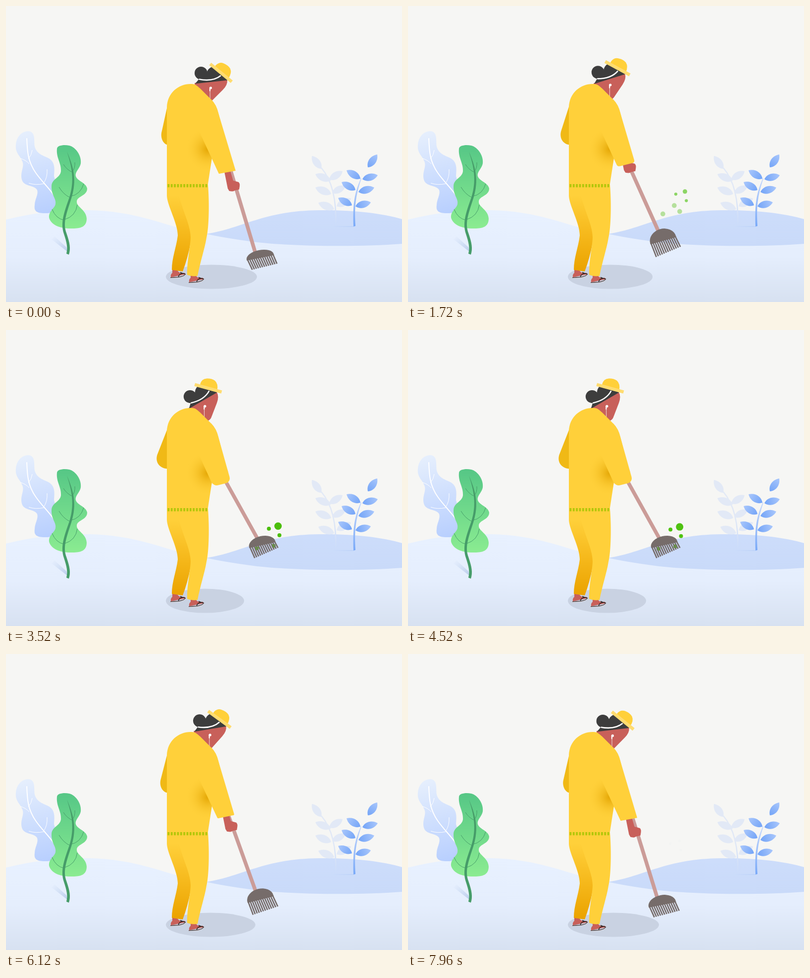
Animation of 800x600 px, one loop 8 s. Source, as an HTML page with a canvas:

```html
<!DOCTYPE html>
<html lang="en">
<head>
<meta charset="utf-8">
<title>Sweeping</title>
<style>
html, body { margin: 0; width: 100%; height: 100%; overflow: hidden; background: #f6f6f4; }
canvas { display: block; width: 800px; height: 600px; }
</style>
</head>
<body>
<canvas id="stage" width="800" height="600"></canvas>
<script>
const ctx = document.getElementById('stage').getContext('2d');
const LOOP = 8000, SWEEP = 1002;
const YELLOW = '#ffd03a', SKIN = '#c8605a', HAIR = '#3d3d3d', BROOM = '#766c6a';

function fill(shape, color) {
  ctx.fillStyle = color;
  ctx.fill(typeof shape === 'string' ? new Path2D(shape) : shape);
}
function stroke(shape, color, width, cap = 'butt') {
  ctx.strokeStyle = color;
  ctx.lineWidth = width;
  ctx.lineCap = cap;
  ctx.stroke(new Path2D(shape));
}
function circle(x, y, r, color) {
  const p = new Path2D();
  p.arc(x, y, r, 0, Math.PI * 2);
  fill(p, color);
}
function gradient(x0, y0, x1, y1, ...colors) {
  const g = ctx.createLinearGradient(x0, y0, x1, y1);
  colors.forEach((c, i) => g.addColorStop(i / (colors.length - 1), c));
  return g;
}
function interpolate(times, values, t) {
  if (t <= times[0]) return values[0];
  for (let i = 1; i < times.length; i++) {
    if (t <= times[i]) {
      const k = (t - times[i - 1]) / (times[i] - times[i - 1]);
      return values[i - 1] + (values[i] - values[i - 1]) * k;
    }
  }
  return values[values.length - 1];
}
function sample(times, tracks, t) {
  const out = {};
  for (const name in tracks) out[name] = interpolate(times, tracks[name], t);
  return out;
}

// Pose values by distance in the cycle from the lowest broom position.
const POSE_TIMES = [0, .056, .122, .2535, .485];
const POSE = {
  shadow: [507, 507, 503, 496, 481],
  head: [0, .5, 4, 9.3, 24],
  elbow: [315, 314.5, 312.5, 310, 305.5],
  outX: [464, 463, 461, 459, 454.5], outY: [334, 332, 325, 318.5, 308],
  inX: [430, 429.5, 427, 424, 419], inY: [340, 338, 332, 327, 317],
  cuff: [.5, .7, 2, 4, 10],
  handX: [0, -1.5, -5.5, -10, -24], handY: [0, -4, -18, -32, -75],
  gripX: [454, 453, 449, 445, 441], gripY: [334, 330, 328, 322, 302],
  baseX: [503, 503, 504, 505, 507], topY: [494, 488, 472, 456, 417],
  leftX: [486, 486, 488, 489, 491], leftY: [514, 512, 500, 487, 440],
  rightX: [541, 541, 540, 541, 544], rightY: [503, 501, 486, 472, 428],
  tipLX: [496, 496, 498, 500, 501], tipLY: [535, 534, 528, 516, 463],
  tipRX: [549, 549.5, 551, 552, 551], tipRY: [522, 520, 509, 494, 441]
};

const DUST_TIMES = [.47, .509, .515, .57, .7465, .878, .944, 1];
const DUST = {
  x: [522, 529, 531.5, 541, 541, 529, 530, 530],
  y: [428, 406.8, 402, 388, 380, 382, 384.5, 386],
  small: [3, 4, 4, 4, 3, 3, 2.5, 2],
  big: [6, 7.5, 7.5, 7, 4, 3, 2.5, 2],
  sat: [90, 84, 90, 85, 52, 4, 4, 4],
  light: [39, 42, 39, 43, 65, 93, 95, 96],
  alpha: [0, .97, 1, 1, 1, 1, .7, 0]
};
const PUFF_TIMES = [.47, .509, .515, .7465, .84];
const PUFF = {
  x: [500, 505, 507, 516, 519],
  y: [454, 445, 442, 418.5, 410],
  r: [3, 4, 4, 5, 5],
  alpha: [0, .9, .9, .3, 0]
};

function leaf(x0, y0, x1, y1, color) {
  const dx = x1 - x0, dy = y1 - y0, w = .3;
  const near = [x0 + dx * .25, y0 + dy * .25], far = [x0 + dx * .7, y0 + dy * .7];
  const p = new Path2D();
  p.moveTo(x0, y0);
  p.bezierCurveTo(near[0] - dy * w, near[1] + dx * w, far[0] - dy * w, far[1] + dx * w, x1, y1);
  p.bezierCurveTo(far[0] + dy * w, far[1] - dx * w, near[0] + dy * w, near[1] - dx * w, x0, y0);
  fill(p, color);
}

function drawLandscape() {
  fill('M0 0H800V600H0Z', '#f6f6f4');
  fill('M0 433C60 418 110 413 170 414C250 416 300 436 350 450Q380 459 405 462H800V600H0Z',
    gradient(0, 414, 0, 600, '#e8f1ff', '#e5eefd', '#d7e1f1'));
  fill('M405 462C480 450 520 415 632 414C700 413 760 420 800 432V482C700 490 560 486 500 478Q440 470 405 462Z',
    gradient(0, 414, 0, 487, '#cdddfb', '#c9daf9'));
}

function drawLeftPlants() {
  fill('M20 280C22 262 35 252 48 254C60 258 56 272 58 285C62 300 75 303 85 308C100 316 98 330 97 345L110 390L100 414C92 420 85 420 78 420C62 420 56 416 58 403C58 392 66 382 63 373C57 362 36 367 32 352C28 336 38 326 33 315C28 302 18 298 20 280Z',
    gradient(40, 254, 80, 420, '#e6effd', '#b8cffe'));
  stroke('M42 268C43 295 44 315 60 338C75 360 95 375 104 398', '#fff', 2);
  stroke('M29 309Q40 312 47 320M45 310Q52 302 53 292M46 359Q60 364 77 360M76 359Q84 348 83 331', '#fff', 1);

  fill('M92 473L98 467L122 489L124 498Z', gradient(93, 468, 122, 496, '#c5d5f000', '#bfd0ee'));
  fill('M103 289C104 282 118 281 128 283C141 286 153 304 151 319C149 330 139 336 141 345C144 355 162 358 164 370C164 385 144 385 143 396C142 408 162 412 163 431C163 448 150 451 135 451C112 452 91 445 87 429C86 415 99 410 100 401C102 390 91 384 92 364C94 349 109 349 111 335C112 318 101 308 103 289Z',
    gradient(0, 283, 0, 451, '#56c786', '#8bec91'));
  fill('M123 295C136 325 144 352 132 390C121 424 115 440 122 460C129 480 131 492 127 504L122 502C125 490 123 480 117 462C110 440 116 422 128 388C139 354 133 325 123 295Z', '#469c69');
  stroke('M116 321Q123 332 134 337M134 336Q140 328 139 317M107 367Q116 382 129 388M130 386Q151 382 157 360M93 412Q101 431 117 434M118 433Q141 426 144 403', '#469c69', 1);
}

function drawRightPlants() {
  const pale = '#e2e9f6';
  stroke('M666 445C668 395 660 355 637 328', gradient(0, 330, 0, 445, pale, '#dfe7f6', '#cbdcfa'), 2.5);
  [[637, 330, 618, 304], [653, 352, 680, 335], [656, 354, 625, 341], [657, 381, 625, 368],
   [659, 379, 686, 365], [663, 412, 631, 399], [668, 406, 697, 390]]
    .forEach(l => leaf(...l, pale));
  stroke('M660 447H703', gradient(660, 0, 703, 0, '#b9d0f800', '#b9d0f8'), 1.5);
  fill('M702 447C701 410 701 385 717 349L718 350C705 388 704 410 706 446Z',
    gradient(0, 350, 0, 447, '#c4d8fc', '#78a8f8'));
  [[731, 327, 750, 301], [716, 350, 688, 333], [720, 351, 751, 343], [706, 373, 678, 357],
   [712, 377, 744, 368], [699, 404, 671, 389], [706, 406, 737, 398]]
    .forEach(l => leaf(...l, gradient(...l, '#73a4f7', '#a9c7fc')));
}

function drawFoot(x, y) {
  ctx.save();
  ctx.translate(x, y);
  fill('M2 -3L11 -2Q13 4 18 6L27 6L28 9L-1 15Q-2 9 2 6Z', SKIN);
  stroke('M-2 15.7L14 14.7Q26 13 29 8', '#4a3a3a', 1.4);
  stroke('M-2 16.8L15 16Q27 14 29.5 9', '#d9d9dc', .8);
  stroke('M14 14Q16 8 23 7L28 8M23 7L18 5', '#262626', 1.4);
  ctx.restore();
}

function drawLegs() {
  drawFoot(334, 535);
  drawFoot(371, 545);
  fill('M325 362V385C326 405 347 440 347 465C344 490 335 510 335 535L357 538Q367 512 373 480L380 362Z',
    gradient(350, 385, 346, 536, YELLOW, '#f6b91c', '#eba300'));
  fill('M345 362H408C411 400 410 448 405 470C402 490 392 520 387 547Q376 549 366 545C365 520 372 490 373 470C373 440 352 410 345 362Z', YELLOW);
}

function drawHead(angle) {
  const a = angle * Math.PI / 180, px = 380.5, py = 187.6;
  ctx.save();
  ctx.translate(px, py);
  ctx.rotate(-a);
  ctx.translate(-px, -py);
  fill('M381 156L447 150Q448 160 438 170L416 192Q408 200 385 190Z', SKIN);
  circle(394, 136, 13, HAIR);
  fill('M382 157.5L391 147L405 136Q408 126 417 123L447 148V150.5Z', HAIR);
  stroke('M390 148.5Q418 154 434 141', '#fff', 2.6);
  fill('M422 123Q424 118 431 115.5Q435 114.5 439 116Q449 120 453 127Q457 136 449 147Z', YELLOW);
  stroke('M412.5 117.5L456 153.5', '#ffdc70', 6.5);
  ctx.restore();
  const dx = 32.7, dy = -21.6, c = Math.cos(a), s = Math.sin(a);
  const x = px + dx * c + dy * s, y = py + dy * c - dx * s;
  circle(x + .3, y, 2.6, '#fff');
  stroke(`M${x - 1.2} ${y}V${y + 6}`, '#fff', 2.2, 'round');
  stroke(`M${x - 1} ${y + 5}V${y + 32}`, '#f1dfdd', 1);
}

function drawTorso() {
  const torso = new Path2D('M325 367V205C326 175 350 157 375 158C383 158 386 162 392 167L415 190Q425 200 429 217L440 260L416 308L407 367Z');
  fill(torso, YELLOW);
  const shade = ctx.createRadialGradient(408, 290, 2, 408, 290, 46);
  shade.addColorStop(0, '#e6a908');
  shade.addColorStop(1, '#ffd03a00');
  fill(torso, shade);
  for (let i = 0; i < 13; i++) fill(`M${326.5 + i * 6.35} 361h3.8v6.5h-3.8Z`, '#b3c60a');
}

function drawBroom(p) {
  stroke(`M${p.gripX} ${p.gripY}L${p.baseX} ${p.topY + 4}`, '#cb9c98', 7.5);

  // The top is half a tilted ellipse whose highest point lies at topY.
  const midX = (p.leftX + p.rightX) / 2, midY = (p.leftY + p.rightY) / 2;
  const dx = p.rightX - p.leftX, dy = p.rightY - p.leftY;
  const tilt = Math.atan2(dy, dx), radius = Math.hypot(dx, dy) / 2;
  const height = Math.sqrt((midY - p.topY) ** 2 - (dy / 2) ** 2) / Math.cos(tilt);
  const dome = new Path2D();
  dome.ellipse(midX, midY, radius, height, tilt, Math.PI, Math.PI * 2);
  dome.lineTo(p.rightX + .6, p.rightY + 2);
  dome.lineTo(p.leftX + .6, p.leftY + 2);
  fill(dome, BROOM);

  const count = 13;
  for (let i = 0; i < count; i++) {
    const k = (i + .4) / (count - .2);
    const mix = (a, b) => a + (b - a) * k;
    stroke(`M${mix(p.leftX, p.rightX)} ${mix(p.leftY, p.rightY)}L${mix(p.tipLX, p.tipRX)} ${mix(p.tipLY, p.tipRY)}`, BROOM, 2.7);
  }
}

function drawArm(p) {
  ctx.save();
  ctx.translate(p.handX, p.handY);
  fill('M440 330H452L459 354L470 357Q473 360 472 366L471 372L462 374Q460 377 451 375L448 370Z', SKIN);
  ctx.restore();
  const sleeve = new Path2D();
  sleeve.moveTo(387, 247);
  sleeve.lineTo(400, 180);
  sleeve.lineTo(415, 190);
  sleeve.quadraticCurveTo(425, 200, 429, 217);
  sleeve.arcTo(p.outX, p.outY, p.inX, p.inY, p.cuff);
  sleeve.arcTo(p.inX, p.inY, 387, 247, p.cuff * 1.2);
  sleeve.closePath();
  fill(sleeve, YELLOW);
}

function drawParticles(phase) {
  const d = sample(DUST_TIMES, DUST, phase);
  const color = `hsla(99,${d.sat}%,${d.light}%,${d.alpha})`;
  circle(d.x, d.y, d.small, color);
  circle(d.x + 18.5, d.y - 5.3, d.big, color);
  circle(d.x + 21.3, d.y + 13.3, d.small, color);
  const f = sample(PUFF_TIMES, PUFF, phase);
  [[0, 0], [23, -17], [34, -5]].forEach(([x, y]) =>
    circle(f.x + x, f.y + y, f.r, `rgba(74,189,10,${f.alpha})`));
}

function draw(time) {
  const phase = time / SWEEP % 1;
  const p = sample(POSE_TIMES, POSE, Math.min(phase, 1 - phase));
  drawLandscape();
  drawLeftPlants();
  drawRightPlants();
  const shadow = new Path2D();
  shadow.ellipse((323 + p.shadow) / 2, 549, (p.shadow - 323) / 2, 24.5, 0, 0, Math.PI * 2);
  fill(shadow, '#c9d2e2');
  fill(`M327 198L${p.elbow} 253C${p.elbow - 4} 266 ${p.elbow + 2} 280 327 281.5Z`, '#f0b916');
  drawLegs();
  drawHead(p.head);
  drawTorso();
  drawParticles(phase);
  drawBroom(p);
  drawArm(p);
}

function frame() {
  draw(performance.now() % LOOP);
  requestAnimationFrame(frame);
}
frame();
</script>
</body>
</html>
```
